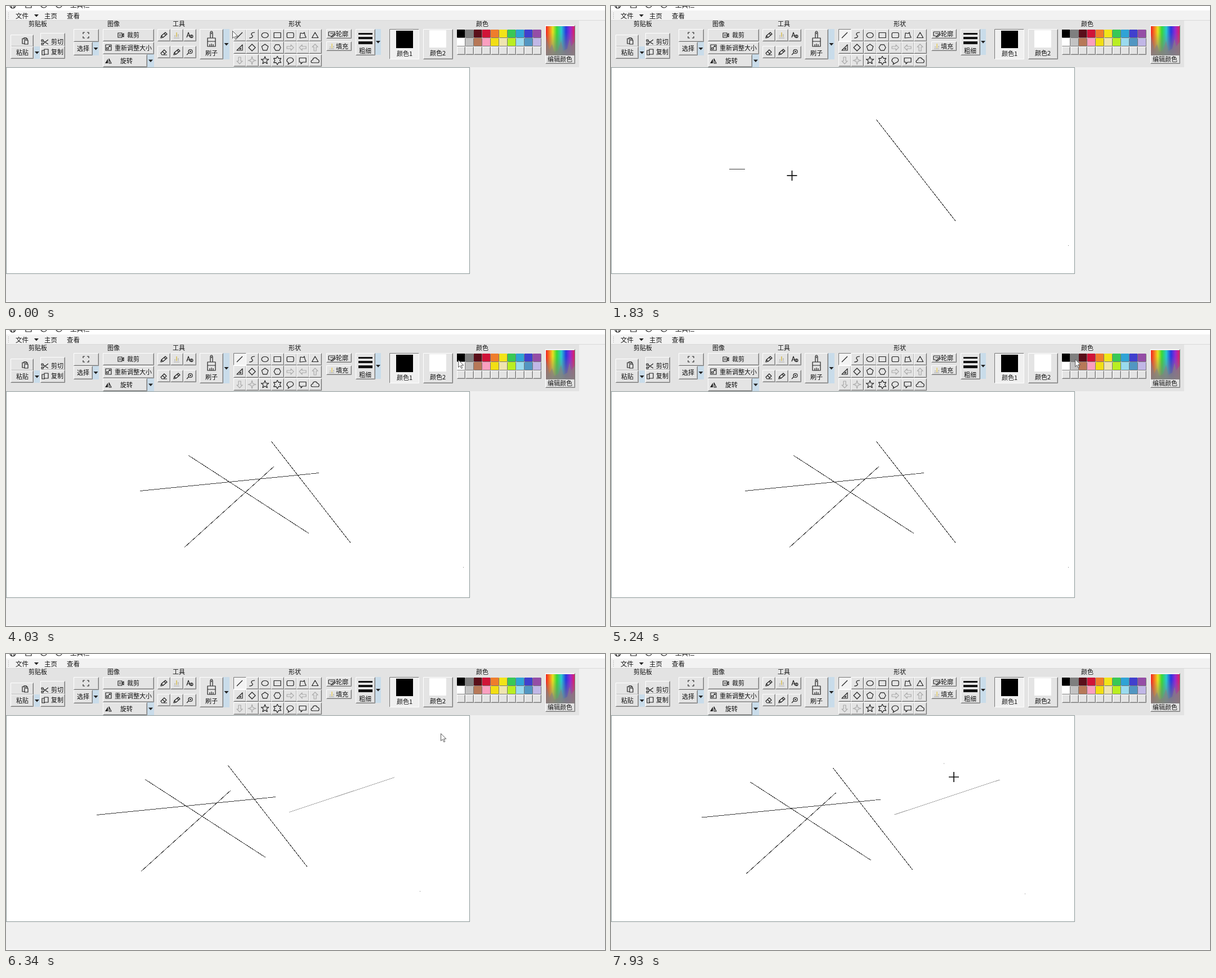
These frames come from a looping animation (1064x527 px, 8000 ms). An HTML page:

```html
<!DOCTYPE html>
<html lang="zh">
<head>
<meta charset="utf-8">
<title>画板</title>
<style>
html, body { margin: 0; width: 100%; height: 100%; overflow: hidden; background: #f0f0f0; }
svg { display: block; width: 1064px; height: 527px; }
text { font: 11px "Noto Sans CJK SC", "Noto Sans CJK", sans-serif; fill: #111; }
.menu { font-size: 11.5px; }
.icon { fill: none; stroke: #222; stroke-width: 1.2; stroke-linejoin: round; }
.off { stroke: #aaa; }
.solid { fill: #222; stroke: none; }
.ink { stroke: #3a3a3a; stroke-width: 1; shape-rendering: crispEdges; }
</style>
</head>
<body>
<svg id="stage" viewBox="0 0 1064 527">
  <defs>
    <linearGradient id="hues">
      <stop offset="0" stop-color="#f02020"/><stop offset=".13" stop-color="#f88020"/>
      <stop offset=".24" stop-color="#e8e020"/><stop offset=".38" stop-color="#38d838"/>
      <stop offset=".54" stop-color="#28c8d0"/><stop offset=".7" stop-color="#2838e0"/>
      <stop offset=".85" stop-color="#9828d0"/><stop offset="1" stop-color="#e02060"/>
    </linearGradient>
    <linearGradient id="fade" x2="0" y2="1">
      <stop offset=".2" stop-color="#808080" stop-opacity="0"/><stop offset="1" stop-color="#808080" stop-opacity=".9"/>
    </linearGradient>
  </defs>
  <g id="chrome"></g>
  <g id="drawing"></g>
  <g id="arrow"><path d="M.5 .5V13.5L3.5 10.7L5.8 15.5L7.8 14.6L5.6 9.9H9.8Z" fill="#fff" stroke="#555"/></g>
  <path id="cross" d="M-9 0H9M0 -9V9" stroke="#111" stroke-width="1.7"/>
</svg>
<script>
const $ = id => document.getElementById(id);
const LOOP = 8000;

const rect = (x, y, w, h, fill, extra = '') => `<rect x="${x}" y="${y}" width="${w}" height="${h}" fill="${fill}" ${extra}/>`;
const text = (x, y, s, cls = '') => `<text x="${x}" y="${y}" class="${cls}">${s}</text>`;
const icon = (x, y, d, cls = '') => `<path class="icon ${cls}" transform="translate(${x} ${y})" d="${d}"/>`;

// Bevelled button given by its edges
function button(l, t, r, b, sunken = false, face = sunken ? '#f3f3f3' : '#e4e4e4') {
  const [hi, lo] = sunken ? ['#777', '#fff'] : ['#fff', '#777'];
  return rect(l, t, r - l, b - t, face) +
    `<path d="M${l + .5} ${b - .5}V${t + .5}H${r - .5}" fill="none" stroke="${hi}"/>` +
    `<path d="M${l + .5} ${b - .5}H${r - .5}V${t + .5}" fill="none" stroke="${lo}"/>` +
    (sunken ? '' : `<path d="M${l + 1.5} ${b - 1.5}H${r - 1.5}V${t + 1.5}" fill="none" stroke="#b4b4b4"/>`);
}
const dropMark = (x, y) => icon(x, y, 'M-4 -2H4L0 2.5Z', 'solid');
const dropdown = (l, t, r, b) => rect(l, t, r - l, b - t, '#c9dcea') + dropMark((l + r) / 2, (t + b) / 2);

// Regular polygon, or a star when an inner radius is given
function poly(n, r, inner, turn = -Math.PI / 2) {
  const count = inner ? n * 2 : n;
  const points = Array.from({ length: count }, (_, i) => {
    const a = turn + i * 2 * Math.PI / count, q = inner && i % 2 ? inner : r;
    return (q * Math.cos(a)).toFixed(1) + ' ' + (q * Math.sin(a)).toFixed(1);
  });
  return 'M' + points.join('L') + 'Z';
}

function titleAndMenu() {
  return rect(0, 0, 1064, 8, '#fff') + rect(0, 8, 1064, 18, '#f2f2f2') +
    icon(12, -1, 'M-5 0A5 5 0 0 0 5 0M-2 0V4M2 0V4') + icon(40, -1, 'M-5 0V4H5V0') +
    icon(67, -1, 'M-5 0A5 4 0 0 0 5 0') + icon(94, -1, 'M-5 0A5 4 0 0 0 5 0') +
    text(114, 3, '工具栏', 'menu') +
    '<path d="M4.5 12V23" stroke="#999" stroke-dasharray="1 2"/>' +
    text(17, 22, '文件', 'menu') + dropMark(54, 17) + text(68, 22, '主页', 'menu') + text(108, 22, '查看', 'menu') +
    rect(0, 26, 1018, 83, '#e3e3e3') + rect(0, 25, 1064, 1, '#d9d9d9') +
    text(40, 36, '剪贴板') + text(180, 36, '图像') + text(296, 36, '工具') + text(502, 36, '形状') + text(835, 36, '颜色');
}

function leftGroups() {
  const pencil = 'M-5 5L-4 1L3 -5L6 -2L-1 4ZM-4 1L-1 4M1 -3L4 0';
  let s = button(8, 51, 49, 73) + button(8, 72, 49, 94) + dropdown(50, 72, 60, 94) +
    icon(34, 62, 'M-2 -4H-5V5H-1M2 -4H4V-1M-2 -5.5H2V-3H-2ZM-1 -1H5V6H-1Z') + text(18, 87, '粘贴') +
    button(61, 48, 105, 72) + button(61, 71, 105, 94) +
    icon(69, 64, 'M-3 -2L6 4M-3 3L6 -4M-6 -4H-3V-1H-6ZM-6 2H-3V5H-6Z') + text(80, 68, '剪切') +
    icon(70, 82, 'M-2 -3H-6V5H-1M-2 -5H5V4H-2Z') + text(80, 86, '复制');
  s += button(120, 41, 165, 64) + button(120, 64, 154, 88) + dropdown(154, 64, 165, 88) +
    icon(142, 52, 'M-5 -2V-5H-2M2 -5H5V-2M5 2V5H2M-2 5H-5V2') + text(126, 80, '选择') +
    button(172, 41, 263, 63) + button(172, 64, 263, 86) + button(172, 86, 251, 109) + dropdown(251, 86, 263, 109) +
    icon(204, 52, 'M-5 -4H2V4H-5ZM2 0L5 -3V3ZM-3 -1H0M-3 1H0') + text(215, 56, '裁剪') +
    icon(182, 74, 'M-5 -5H5V5H-5ZM-3 3V0H0V3ZM0 -1L3 -3M1 -3H3V-1') + text(193, 79, '重新调整大小') +
    icon(182, 98, 'M-1 -4V4H-6Z', 'solid') + icon(182, 98, 'M1 -4V4H5Z') + text(203, 102, '旋转');
  const tools = [
    [pencil],
    ['M-5 5H5M-3 3V0M0 3V-5M3 3V-2', 'off'],
    ['M-5 4L-2 -5L1 4M-4 1H0M1 2A2.5 2.5 0 1 0 6 2A2.5 2.5 0 1 0 1 2M3.5 0V4'],
    ['M-5 2L1 -4L5 0L0 5H-3ZM-2 -1L2 3M0 5H6'],
    [pencil],
    ['M-2 -1A3.5 3.5 0 1 0 5 -1A3.5 3.5 0 1 0 -2 -1M-1 1L-5 5M0 -1H3M1.5 -2.5V.5']
  ];
  tools.forEach(([d, cls], i) => {
    const x = 269 + i % 3 * 23, y = i < 3 ? 41 : 71;
    s += button(x, y, x + 23, y + 22) + icon(x + 11, y + 11, d, cls);
  });
  s += icon(303, 52, 'M0 3V-5', '" style="stroke:#e8c840');
  return s + button(344, 41, 386, 95) + dropdown(386, 41, 397, 95) +
    icon(365, 59, 'M-2 -2V-11A2 3 0 0 1 2 -11V-2M-7 4V-2H7V4ZM-7 4V13H7V4M-3 13V9M0 13V8M3 13V9M0 -12V-9') +
    text(354, 88, '刷子');
}

function shapeGroup() {
  const arrowRight = 'M-6 -2H1V-5L6 0L1 5V2H-6Z';
  const shapes = [
    'M-5 5L5 -5', 'M-5 5C2 5 2 1 0 0S-2 -5 5 -5', 'M-6 0A6 4.5 0 1 0 6 0A6 4.5 0 1 0 -6 0', 'M-6 -4.5H6V4.5H-6Z',
    'M-4 -4.5H4Q6 -4.5 6 -2V2Q6 4.5 4 4.5H-4Q-6 4.5 -6 2V-2Q-6 -4.5 -4 -4.5Z', 'M-4 -4L1 -3L3 -5L4 0L6 4L-5 5Z', 'M0 -5L5.5 4.5H-5.5Z',
    'M5 -5V5H-5ZM2 1V3H0Z', poly(4, 6), poly(5, 6), poly(6, 6, 0, 0),
    arrowRight, 'M6 -2H-1V-5L-6 0L-1 5V2H6Z', 'M-2 6V-1H-5L0 -6L5 -1H2V6Z',
    'M-2 -6V1H-5L0 6L5 1H2V-6Z', poly(4, 7, 2.2), poly(5, 7, 3), poly(6, 7.5, 4.3),
    'M-3 4C-9 1 -5 -5 0 -5S9 1 1 4L-4 7Z', 'M-6 -4.5H6V3H0L-3 6V3H-6Z', 'M-4 4C-9 4 -7 -1 -4 -1C-4 -6 3 -6 4 -2C8 -2 8 4 5 4Z'
  ];
  let s = '';
  shapes.forEach((d, i) => {
    const x = 404 + Math.round(i % 7 * 22.4), y = 41 + Math.floor(i / 7) * 22.5 | 0;
    const cell = button(x, y, x + 23, y + 22);
    s += cell + icon(x + 11, y + 11, d, i > 10 && i < 16 ? 'off' : '');
  });
  s += `<g id="linePressed">${button(404, 41, 427, 63, true)}${icon(415, 52, shapes[0])}</g>`;
  s += button(569, 41, 614, 58) + button(569, 63, 614, 80) +
    icon(579, 50, 'M-6 -4H5V-1M-6 -4V3H-2M-3 -1H3M-2 5L5 -1L6 1L1 5Z') + text(586, 54, '轮廓') +
    icon(579, 72, 'M-5 4H4M-3 2V0M3 2V-1', 'off') + icon(579, 72, 'M0 3V-5', '" style="stroke:#e8c840') + text(586, 76, '填充');
  return s + button(621, 41, 656, 88) + dropdown(656, 41, 666, 87) +
    rect(626, 48, 25, 3, '#111') + rect(626, 55, 25, 4, '#111') + rect(626, 63, 25, 5, '#111') + text(627, 84, '粗细');
}

function colourGroup() {
  const colours = ['#000', '#7f7f7f', '#5a0f1a', '#d01438', '#ef7d2c', '#f2e418', '#38c856', '#2fa3d6', '#4040ce', '#954da6',
    '#fff', '#c3c3c3', '#b77858', '#fa9fbf', '#f2de14', '#eee4b0', '#b9ee22', '#9adaee', '#5296c2', '#c1b7e6'];
  let s = button(681, 41, 734, 95, true, '#f0f0f0') + rect(693, 44, 30, 31, '#000') + text(694, 89, '颜色1') +
    button(741, 41, 794, 95) + rect(752, 43, 30, 31, '#fff') + text(753, 88, '颜色2');
  for (let i = 0; i < 30; i++) {
    const x = 801 + i % 10 * 15, y = 42 + Math.floor(i / 10) * 15;
    s += button(x, y, x + 15, y + 15);
    if (colours[i]) s += rect(x, y, 14, 14, colours[i]);
  }
  s += `<g id="grayPressed">${button(816, 42, 831, 56, true, '#7f7f7f')}</g>`;
  s += button(958, 34, 1011, 103) + rect(959, 36, 51, 52, 'url(#hues)') + rect(959, 36, 51, 52, 'url(#fade)');
  const drips = 'M959 88V52L965 78L970 68L974 82L981 78L986 62L990 80L997 76L1001 58L1004 72L1010 64V88Z';
  return s + `<path d="${drips}" fill="#858080" opacity=".6"/>` + text(962, 99, '编辑颜色');
}

$('chrome').innerHTML = titleAndMenu() + leftGroups() + shapeGroup() + colourGroup() +
  rect(.5, 109.5, 823, 367, '#fff', 'stroke="#8d9999"') + rect(0, 525, 1064, 2, '#f8f8f8');

// Keys are [time, x, y]
function at(keys, t) {
  const n = keys.findIndex(k => k[0] > t);
  if (n < 0) return keys[keys.length - 1].slice(1);
  if (n === 0) return keys[0].slice(1);
  const [a, b] = [keys[n - 1], keys[n]];
  const p = (t - a[0]) / (b[0] - a[0]);
  return [1, 2].map(i => a[i] + (b[i] - a[i]) * p);
}

const pointer = [
  [60, 402, 44], [250, 414, 50], [500, 471, 202], [750, 535, 285], [880, 535, 285], [1230, 612, 383], [1650, 238, 291],
  [1710, 238, 291], [1775, 200, 291], [1830, 321, 302], [2280, 556, 254], [2470, 330, 380], [2540, 317, 386], [2620, 317, 386],
  [2900, 476, 242], [3090, 322, 222], [3250, 324, 223], [3640, 538, 362], [4020, 803, 53], [4160, 803, 53], [4460, 825, 51],
  [5240, 825, 51], [5540, 580, 281], [5790, 692, 236], [5960, 690, 219], [6150, 690, 219], [6560, 866, 52], [6980, 866, 52],
  [7280, 847, 47], [7800, 853, 47], [7860, 591, 195], [7930, 609, 219]
];
const drags = [[500, 1240], [1700, 2300], [2600, 2920], [3250, 3660], [5540, 5980], [7850, LOOP]];
const scroll = [[2180, 0, 4], [2400, 0, 0], [5560, 0, 0], [5790, -50, 0], [5960, -77, 0], [7850, -77, 0], [7858, -77, 4.5]];

// Each stroke: the path of its free end; the first key is the fixed end
const strokes = [
  [[500, 471, 198], [750, 530, 274], [880, 530, 274], [1240, 612, 379]],
  [[1710, 238, 286], [1790, 200, 286], [1830, 209, 286], [2300, 556, 254]],
  [[2620, 317, 386], [2920, 476, 242]],
  [[3250, 324, 223], [3660, 538, 362]],
  [[5560, 580, 281], [5790, 712, 225], [5960, 767, 219]]
];
const dots = [[1000, 812, 422], [7850, 668, 190]];

const svgNode = (name, attrs) => {
  const node = document.createElementNS($('stage').namespaceURI, name);
  for (const key in attrs) node.setAttribute(key, attrs[key]);
  return $('drawing').appendChild(node);
};
const lines = strokes.map((keys, i) => svgNode('line', { class: 'ink', x1: keys[0][1] + .5, y1: keys[0][2] + .5, style: i === 4 ? 'stroke:#aaa' : '' }));
const specks = dots.map(([, x, y]) => svgNode('rect', { x, y, width: 1, height: 1, fill: '#777' }));

const show = (node, on) => { node.style.visibility = on ? 'visible' : 'hidden'; };
const place = (node, [x, y]) => node.setAttribute('transform', `translate(${x.toFixed(1)} ${y.toFixed(1)})`);

function frame() {
  const t = performance.now() % LOOP;
  const dragging = drags.some(([from, to]) => t >= from && t < to);
  place($('drawing'), at(scroll, t));
  lines.forEach((line, i) => {
    const [x, y] = at(strokes[i], t);
    line.setAttribute('x2', x + .5);
    line.setAttribute('y2', y + .5);
    show(line, t >= strokes[i][0][0]);
  });
  specks.forEach((speck, i) => show(speck, t >= dots[i][0]));
  for (const id of ['arrow', 'cross']) {
    place($(id), at(pointer, t));
    show($(id), dragging === (id === 'cross'));
  }
  show($('linePressed'), t >= 250);
  show($('grayPressed'), t >= 4790 && t < 4920);
  requestAnimationFrame(frame);
}
frame();
</script>
</body>
</html>
```
